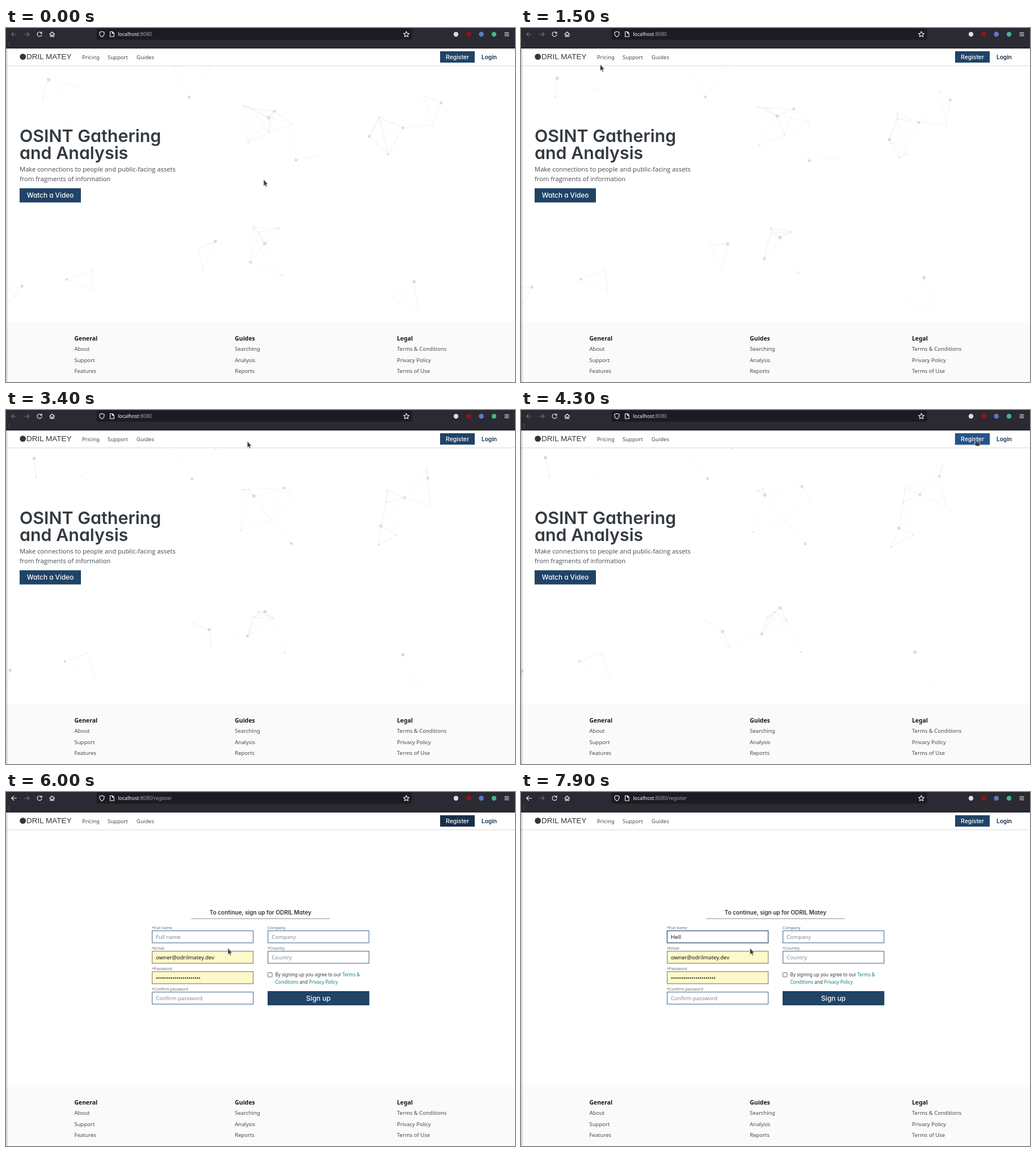
Recreate the animation shown at these times as an HTML page with a canvas. Size 897 px wide and 624 px high, loop 8000 ms.

```html
<!DOCTYPE html>
<html lang="en">
<head>
<meta charset="utf-8">
<title>Sign up</title>
<style>
html, body { margin: 0; width: 100%; height: 100%; overflow: hidden; background: #fff; }
canvas, svg { position: absolute; left: 0; top: 0; width: 897px; height: 624px; }
text { font-family: "Noto Sans", sans-serif; font-size: 9.5px; fill: #444a50; white-space: pre; }
.geo { font-family: Inter, sans-serif; font-feature-settings: "cv11"; font-weight: 500; }
.h1 { font-size: 30.4px; font-weight: 600; fill: #343a40; }
.lead { font-family: "Open Sans", sans-serif; font-size: 11.23px; }
.brand { font-family: "Liberation Sans", Arial, sans-serif; font-size: 13.5px; fill: #33373c; }
.url { font-size: 8.8px; fill: #fbfbfe; }
.url .dim { fill: #a3a2aa; }
.head { font-size: 10.4px; font-weight: 700; fill: #15181b; }
.label { font-size: 7px; fill: #666d74; }
.hint { fill: #81868c; }
.value { fill: #111; }
.small { font-size: 8.05px; fill: #343a40; }
.link { fill: #137d80; }
.white { fill: #fff; }
.mid { text-anchor: middle; }
.button { fill: #204366; }
.button.hover { fill: #26538a; filter: drop-shadow(0 1px 1.5px rgba(0, 0, 0, .25)); }
.button.pressed { fill: #182f49; }
.field { fill: #fff; stroke: #6484a6; stroke-width: 1.3; }
.field.auto { fill: #fff8c8; stroke: #8a8f86; }
.field.focus { stroke: #5d7590; stroke-width: 1.7; }
.icon { fill: none; stroke: #fbfbfe; stroke-width: 1.1; stroke-linecap: round; stroke-linejoin: round; }
.off { stroke: #74737b; }
.pointer { fill: #3b3d40; stroke: #e6e6e6; stroke-width: .7; stroke-linejoin: round; }
</style>
</head>
<body>
<canvas id="net" width="897" height="624"></canvas>
<svg viewBox="0 0 897 624">
  <defs>
    <linearGradient id="edge"><stop stop-opacity=".22"/><stop offset="1" stop-opacity="0"/></linearGradient>
    <linearGradient id="lift" x2="0" y2="1"><stop stop-opacity="0"/><stop offset="1" stop-opacity=".03"/></linearGradient>
    <linearGradient id="drop" x2="0" y2="1"><stop stop-opacity=".16"/><stop offset="1" stop-opacity="0"/></linearGradient>
  </defs>

  <g id="home">
    <text class="geo h1" x="24" y="201">OSINT Gathering</text>
    <text class="geo h1" x="24" y="231">and Analysis</text>
    <text class="lead" x="24" y="252.6">Make connections to people and public-facing assets</text>
    <text class="lead" x="24" y="270">from fragments of information</text>
    <rect id="video" x="24" y="282.5" width="108" height="25"/>
    <text class="geo white mid" x="78" y="299.4" style="font-size:11.8px">Watch a Video</text>
  </g>

  <g id="signup">
    <text class="geo mid" x="448.5" y="216.4" style="font-size:10px;font-weight:600;fill:#30353a">To continue, sign up for ODRIL Matey</text>
    <path d="M326.5 223.3H570.5" stroke="#8b9096"/>
    <g id="fields"></g>
    <rect x="461.5" y="318.5" width="7.5" height="7.5" rx="1" fill="#fff" stroke="#62666c"/>
    <text class="small" x="474.5" y="325.4">By signing up you agree to our <tspan class="link">Terms &amp;</tspan></text>
    <text class="small" x="474.5" y="337.8"><tspan class="link">Conditions</tspan> and <tspan class="link">Privacy Policy</tspan></text>
    <rect class="button" x="461" y="351" width="179.3" height="25"/>
    <text class="geo white mid" x="550.5" y="368" style="font-size:12px">Sign up</text>
  </g>

  <rect y="515" width="897" height="10" fill="url(#lift)"/>
  <rect y="525" width="897" height="99" fill="#fafafa" opacity=".92"/>
  <g id="footer"></g>

  <rect y="36" width="897" height="30" fill="#fff"/>
  <rect y="66" width="897" height="2" fill="url(#drop)"/>
  <circle cx="29.7" cy="50.6" r="5.4" fill="#33373c"/>
  <text class="brand" x="36" y="55">DRIL MATEY</text>
  <text x="134" y="54.6">Pricing</text>
  <text x="179" y="54.6">Support</text>
  <text x="230" y="54.6">Guides</text>
  <rect id="register" x="765" y="41" width="61" height="20"/>
  <text class="geo white mid" x="795.5" y="54.9" style="font-size:10.4px">Register</text>
  <text class="geo mid" x="851.5" y="54.9" style="font-size:10.1px;font-weight:600;fill:#122f4f">Login</text>
  <rect y="36" width="4" height="588" fill="url(#edge)"/>

  <rect width="897" height="36" fill="#2b2a33"/>
  <path d="M0 35.6H897" stroke="#111016"/>
  <path d="M5.5 24V33" stroke="#4b4a53"/>
  <rect x="159.5" y="1" width="556" height="19.5" rx="2.5" fill="#1c1b22"/>
  <g class="icon">
    <path id="back" d="M18.5 11H10M13.5 7.3L9.8 11L13.5 14.7"/>
    <path class="off" d="M32.3 11H40.8M37.3 7.3L41 11L37.3 14.7"/>
    <path d="M62.3 8.6A4 4 0 1 0 63 11.8M63 6.8V9.3H60.3"/>
    <path d="M77 11L81.3 7L85.6 11M78.2 10.4V15H84.4V10.4M80.3 15V12.2H82.3V15"/>
    <path d="M169 6.3L173 7.6V10.3Q172.6 14 169 15.7Q165.4 14 165 10.3V7.6Z"/>
    <path d="M183.6 6.5H187.6L190.3 9.2V15.2H183.6ZM187.4 6.7V9.4H190"/>
    <path d="M705.5 6L707 9.2L710.4 9.6L707.9 12L708.6 15.4L705.5 13.7L702.4 15.4L703.1 12L700.6 9.6L704 9.2Z"/>
    <path d="M879 8.2H886M879 11H886M879 13.8H886"/>
  </g>
  <circle cx="793" cy="11" r="4.2" fill="#dddde2"/>
  <circle cx="815.5" cy="11" r="4.2" fill="#9c1018"/>
  <circle cx="837.7" cy="11" r="4.4" fill="#5a78c4"/>
  <circle cx="860" cy="11" r="4.2" fill="#41b883"/>
  <text class="url" x="197.3" y="14">localhost<tspan class="dim">:8080</tspan><tspan class="dim" id="path"></tspan></text>

  <g id="status">
    <path d="M0 610H92Q94.5 610 94.5 612.5V624H0Z" fill="#b8b8ba"/>
    <text class="white" x="1.8" y="620.6" style="font-size:8.2px">localhost:8080/register</text>
  </g>

  <g id="cursor">
    <path id="arrow" class="pointer" d="M0 0V11.5L2.5 9.4L4.2 13.2L6 12.4L4.5 8.8L7.4 8.3Z"/>
    <path id="hand" class="pointer" d="M-1.2 1.2Q0-1 1.3 1L2.5 4.5L6.3 5.4Q8 6 7.7 8L7 12H1.2L-3 8Q-3.6 6.4-2 6.6L0 7.6Z"/>
    <path id="beam" d="M-2-8H2M0-8V8M-2 8H2" fill="none" stroke="#3b3d40"/>
  </g>
</svg>

<script>
const LOOP = 8000, STEP = 100, LINK = 76, DRIFT_TIME = 4300;
const PRESS = 4500, REGISTER_PAGE = 4600, AUTOFILL = 4800, STATUS_END = 4900, FOCUS = 6700;
const holds = [[0, 200], [2500, 2900], [3100, 3300], [3700, 3900], [4300, 4500]];
const keyPresses = [7500, 7600, 7800, 7900];
const $ = id => document.getElementById(id);

// Pointer stops: time, x, y
const stops = [
  [0, 454, 267], [200, 454, 267], [1500, 139.5, 64], [2500, 121, 293.5], [3100, 300, 56],
  [4300, 801, 51.5], [4700, 801, 51.5], [5000, 562, 250], [5100, 562, 250], [5300, 386, 250],
  [5700, 376, 250], [6000, 391, 275], [6200, 394, 298], [6600, 390, 251], [7000, 403.5, 275]
];

// Main dots of the background web: x, y, drift x, drift y
const hubs = [
  [75, 91, -32, -7], [323, 122, 6, -1], [473, 147, 22, -12], [463, 158, -33, -8], [511, 233, -10, 3],
  [640, 191, 26, 17], [700, 176, 3, -27], [767, 132, -30, -15], [369, 376, -14, 14], [431, 413, -7, -18],
  [456, 380, 1, -31], [719, 447, -25, -20], [28, 455, -26, 5], [107, 443, -4, 0]
];

function seeded(seed) {
  return () => (seed = (seed * 16807) % 2147483647) / 2147483647;
}

// Each hub is ringed by small companions that drift their own way.
const random = seeded(4711);
const between = (lo, hi) => lo + (hi - lo) * random();
const dots = hubs.flatMap(([x, y, dx, dy]) => {
  const turn = between(0, 2 * Math.PI);
  const companions = [0, 1].map(i => {
    const angle = turn + i * between(.7, 2.2), reach = between(30, 65);
    return {
      x: x + reach * Math.cos(angle), y: y + reach * Math.sin(angle),
      dx: between(-22, 22), dy: between(-22, 22), r: between(.5, 1.4)
    };
  });
  return [{ x, y, dx, dy, r: between(2.2, 3.1) }, ...companions];
});

function pointerAt(t) {
  const i = stops.findLastIndex(s => s[0] <= t);
  const [t0, x0, y0] = stops[i];
  const [t1, x1, y1] = stops[i + 1] || [LOOP, x0, y0];
  const f = (t - t0) / (t1 - t0);
  return [x0 + (x1 - x0) * f, y0 + (y1 - y0) * f];
}

function stepTime(t) {
  const s = Math.floor(t / STEP) * STEP;
  const hold = holds.find(([from, to]) => s >= from && s < to);
  return hold ? hold[0] : s;
}

function add(parent, tag, attrs, text = "") {
  const el = document.createElementNS("http://www.w3.org/2000/svg", tag);
  for (const name in attrs) el.setAttribute(name, attrs[name]);
  el.textContent = text;
  return parent.appendChild(el);
}

function over(rect, x, y) {
  const [left, top, width, height] = ["x", "y", "width", "height"].map(a => +rect.getAttribute(a));
  return x >= left && x <= left + width && y >= top && y <= top + height;
}

[[120.5, "General", "About", "Support", "Features"],
 [403.3, "Guides", "Searching", "Analysis", "Reports"],
 [689, "Legal", "Terms & Conditions", "Privacy Policy", "Terms of Use"]
].forEach(([x, title, ...links]) => {
  add($("footer"), "text", { x, y: 550.5, class: "head" }, title);
  links.forEach((s, i) => add($("footer"), "text", { x, y: 568.6 + i * 19.9 }, s));
});

const boxes = [];
function addField(col, row, label, hint) {
  const x = 257 + col * 204, y = 244.6 + row * 36;
  add($("fields"), "text", { x, y: y - 2.6, class: "label" }, label);
  const box = add($("fields"), "rect", { x: x + .6, y, width: 178, height: 21.3, class: "field" });
  const text = add($("fields"), "text", { x: x + 7.3, y: y + 14.1, class: "hint" }, hint);
  boxes.push(box);
  return (value, state) => {
    box.setAttribute("class", "field " + state);
    text.setAttribute("class", value ? "value" : "hint");
    text.textContent = value || hint;
  };
}
const setName = addField(0, 0, "*Full name", "Full name");
const setEmail = addField(0, 1, "*Email", "Email");
const setPassword = addField(0, 2, "*Password", "Your password");
addField(0, 3, "*Confirm password", "Confirm password");
addField(1, 0, "Company", "Company");
addField(1, 1, "*Country", "Country");

const ctx = $("net").getContext("2d");
function drawNet(t) {
  ctx.clearRect(0, 0, 897, 624);
  if (t >= REGISTER_PAGE) return;
  const p = t / DRIFT_TIME;
  const now = dots.map(({ x, y, dx, dy, r }) => ({ x: x + dx * p, y: y + dy * p, r }));
  ctx.lineWidth = .7;
  now.forEach((a, i) => now.slice(i + 1).forEach(b => {
    const d = Math.hypot(a.x - b.x, a.y - b.y);
    if (d >= LINK) return;
    ctx.strokeStyle = `rgba(140,140,140,${.03 + .3 * (1 - d / LINK)})`;
    ctx.beginPath();
    ctx.moveTo(a.x, a.y);
    ctx.lineTo(b.x, b.y);
    ctx.stroke();
  }));
  ctx.fillStyle = "#dcdcdc";
  for (const { x, y, r } of now) {
    ctx.beginPath();
    ctx.arc(x, y, r, 0, 7);
    ctx.fill();
  }
}

const show = (id, on) => $(id).setAttribute("visibility", on ? "visible" : "hidden");

function render(t) {
  const onRegister = t >= REGISTER_PAGE, filled = t >= AUTOFILL, focused = t >= FOCUS;
  const [x, y] = pointerAt(t);
  const onVideo = !onRegister && over($("video"), x, y);
  const onButton = over($("register"), x, y);
  const onField = onRegister && boxes.some(box => over(box, x, y));
  const pressed = t >= PRESS && !focused;

  drawNet(t);
  $("home").style.display = onRegister ? "none" : "";
  $("signup").style.display = onRegister ? "" : "none";
  show("status", onRegister && t < STATUS_END);
  $("video").setAttribute("class", onVideo ? "button hover" : "button");
  $("register").setAttribute("class", "button" + (onButton ? " hover" : "") + (pressed ? " pressed" : ""));
  $("back").setAttribute("class", onRegister ? "" : "off");
  $("path").textContent = onRegister ? "/register" : "";

  const typed = keyPresses.filter(at => at <= t).length;
  setName("Hell".slice(0, typed), focused ? "focus" : "");
  setEmail(filled ? "owner@odrilmatey.dev" : "", filled ? "auto" : "");
  setPassword(filled ? "•".repeat(22) : "", filled ? "auto" : "");

  const shape = onVideo || onButton ? "hand" : onField ? "beam" : "arrow";
  $("cursor").setAttribute("transform", `translate(${x} ${y})`);
  for (const id of ["arrow", "hand", "beam"]) show(id, id === shape);
}

const start = performance.now();
function tick() {
  render(stepTime((performance.now() - start) % LOOP));
  requestAnimationFrame(tick);
}
tick();
</script>
</body>
</html>
```
